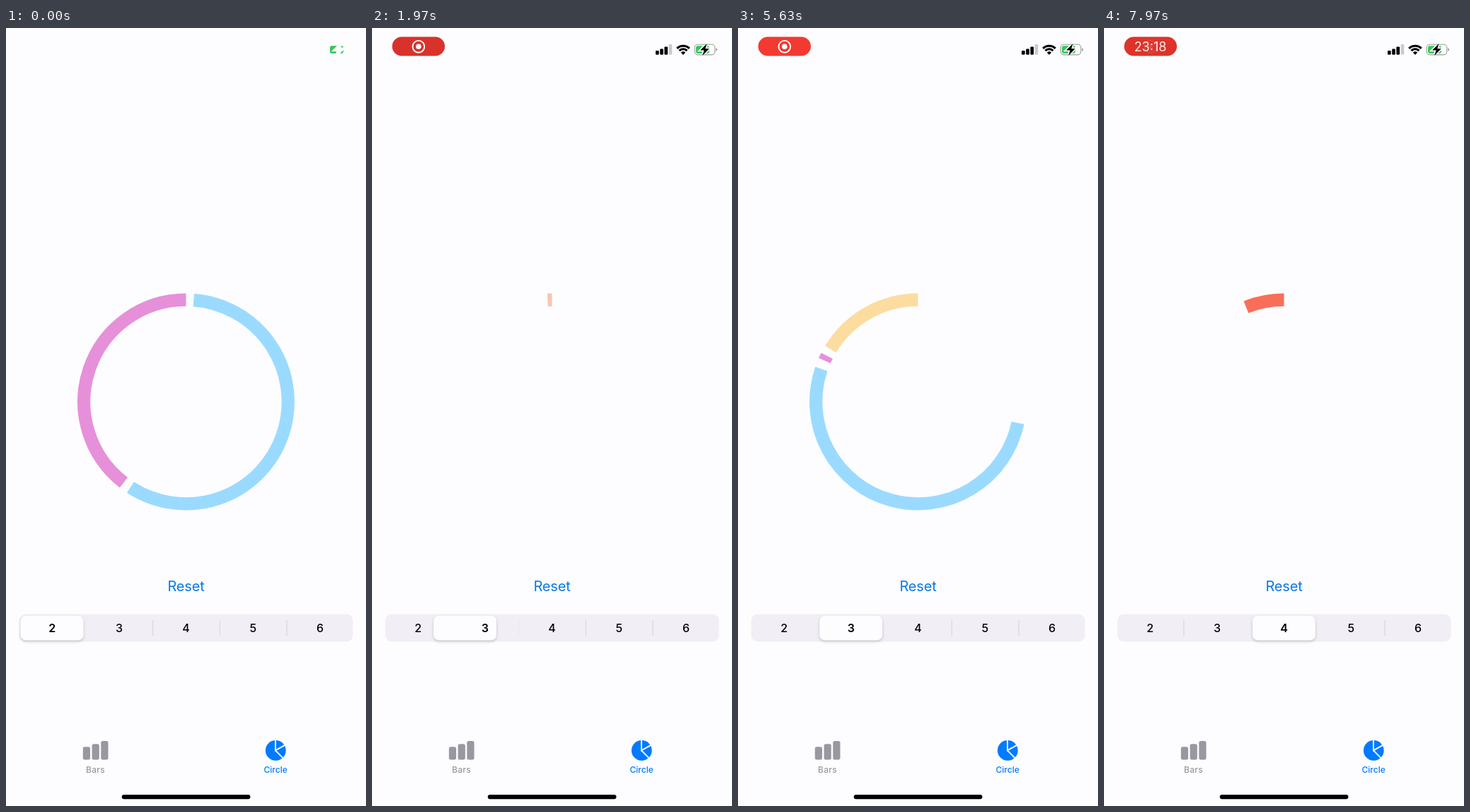
Animation of 509 by 1101 pixels, one loop 7990 ms. Source, as an HTML page:

```html
<!DOCTYPE html>
<html lang="en">
<head>
<meta charset="utf-8">
<title>Circle chart</title>
<style>
  html, body { margin: 0; width: 100%; height: 100%; overflow: hidden; background: #fdfdff; }
  svg { display: block; width: 100%; height: 100%; }
  text { font-family: Inter, "Liberation Sans", sans-serif; text-anchor: middle; }
</style>
</head>
<body>
<svg viewBox="0 0 509 1101">
  <defs>
    <filter id="shadow" x="-20%" y="-30%" width="140%" height="170%">
      <feDropShadow dx="0" dy="2" stdDeviation="2" flood-color="#000" flood-opacity=".2"/>
    </filter>
  </defs>
  <rect width="509" height="1101" fill="#fdfdff"/>

  <!-- recording pill -->
  <g id="pill">
    <rect id="pillBack" x="28.5" y="12.5" width="74.5" height="27" rx="13.5"/>
    <g id="record" fill="none" stroke="#fff" stroke-width="1.9">
      <circle cx="65.8" cy="26.3" r="8.4"/>
      <circle cx="65.8" cy="26.3" r="3.8" fill="#fff" stroke="none"/>
    </g>
    <text id="clock" x="65.5" y="32.7" font-size="18" fill="#fff">23:18</text>
  </g>

  <!-- status icons -->
  <rect x="458" y="25.3" width="19" height="10.6" rx="2.4" fill="#34c759"/>
  <path d="M473.5 22.3L464 31.6H469.6L467.2 38.9L476.8 29.3H471.3Z" fill="#fdfdff" stroke="#fdfdff" stroke-width="3.4"/>
  <g id="ink">
    <rect x="401" y="32" width="4.7" height="5.7" rx="1.2"/>
    <rect x="407.2" y="29.6" width="4.7" height="8.1" rx="1.2"/>
    <rect x="413.4" y="26.4" width="4.7" height="11.3" rx="1.2"/>
    <rect x="419.6" y="23" width="4.7" height="14.7" rx="1.2" fill="#cbcbcd"/>
    <g fill="none" stroke="#000" stroke-width="3">
      <path d="M431.2 28.8A12.8 12.8 0 0 1 448.8 28.8"/>
      <path d="M434.5 32.1A7.9 7.9 0 0 1 445.5 32.1"/>
    </g>
    <path d="M440 38L436.9 34.7A4.5 4.5 0 0 1 443.1 34.7Z"/>
    <rect x="456.2" y="23.3" width="28.6" height="14.6" rx="4.3" fill="none" stroke="#9b9b9d" stroke-width="1.1"/>
    <path d="M486.3 28.2Q488.2 29 488.2 30.6T486.3 33Z" fill="#9b9b9d"/>
    <path d="M473.5 22.3L464 31.6H469.6L467.2 38.9L476.8 29.3H471.3Z"/>
  </g>

  <g id="ring" fill="none" stroke-width="18.3"></g>

  <text x="254.5" y="797" font-size="20" letter-spacing="-.15" fill="#087ae4">Reset</text>

  <!-- segmented control -->
  <rect x="18.8" y="829.5" width="471.7" height="39" rx="9" fill="#f2eef5"/>
  <g id="dividers" fill="#d9d6dd"></g>
  <rect id="knob" x="20.7" y="831.8" width="88.6" height="34.4" rx="7.5" fill="#fdfdff" filter="url(#shadow)"/>
  <g id="digits" font-size="16"></g>

  <!-- tab bar -->
  <g fill="#9997a0">
    <rect x="108.8" y="1017.2" width="10.2" height="18.2" rx="2.6"/>
    <rect x="121.6" y="1013.2" width="10.2" height="22.2" rx="2.6"/>
    <rect x="134.3" y="1009" width="10.2" height="26.4" rx="2.6"/>
    <text x="126.5" y="1054" font-size="12" font-weight="500" letter-spacing=".25">Bars</text>
  </g>
  <g fill="#007aff">
    <circle cx="381.3" cy="1022.4" r="14.4"/>
    <path d="M381 1007V1022.4L395.5 1014.2M381 1022.4L392 1033.6" fill="none" stroke="#fdfdff" stroke-width="2"/>
    <text x="381.2" y="1054" font-size="12" font-weight="500" letter-spacing=".05">Circle</text>
  </g>
  <rect x="163.7" y="1085" width="181.8" height="6.2" rx="3.1"/>
</svg>
<script>
const LOOP = 7990;
const PINK = [230, 144, 218], BLUE = [155, 218, 255];
const YELLOW = [253, 220, 159], CORAL = [249, 110, 88];
// Chart states: start time and slices as [from, to, colour], degrees counterclockwise from the top
const charts = [
  { start: -1e4, slices: [[0, 142.4, PINK], [147, 355.7, BLUE]] },
  { start: 1908, slices: [[0, 58.9, YELLOW], [63.2, 66.2, PINK], [71.2, 355.7, BLUE]] },
  { start: 7415, slices: [[0, 140, CORAL]] }
];
// Drawn angle against time since the chart began
const sweepKeys = [[0, 0], [1362, 53.5], [1455, 63.2], [1502, 71], [2202, 122.5],
  [2762, 171.2], [3042, 198.8], [3882, 272], [4645, 356]];
const STEP = 94.7;

const $ = id => document.getElementById(id);
const clamp = x => Math.min(1, Math.max(0, x));
const ramp = (t, from, length) => clamp((t - from) / length);
const smooth = x => x * x * (3 - 2 * x);
const mix = (a, b, k) => a + (b - a) * k;
const rgb = c => `rgb(${c.map(Math.round)})`;
const blend = (a, b, k) => a.map((v, i) => mix(v, b[i], k));

function add(parent, tag, attrs) {
  const el = document.createElementNS('http://www.w3.org/2000/svg', tag);
  for (const name in attrs) el.setAttribute(name, attrs[name]);
  return parent.appendChild(el);
}

const arcs = [0, 1, 2].map(() => add($('ring'), 'path', {}));
const dividers = [0, 1, 2, 3].map(i =>
  add($('dividers'), 'rect', { x: 112.3 + i * STEP, y: 838, width: 1.2, height: 22 }));
const digits = [0, 1, 2, 3, 4].map(i => {
  const el = add($('digits'), 'text', { x: 65.2 + i * STEP, y: 855 });
  el.textContent = i + 2;
  return el;
});

function sweep(age) {
  for (let i = 1; i < sweepKeys.length; i++) {
    const [t0, a0] = sweepKeys[i - 1], [t1, a1] = sweepKeys[i];
    if (age < t1) return mix(a0, a1, (age - t0) / (t1 - t0));
  }
  return 360;
}

function arcPath(from, to) {
  const point = deg => {
    const a = deg * Math.PI / 180;
    return `${254.5 - 144.3 * Math.sin(a)} ${529 - 144.3 * Math.cos(a)}`;
  };
  return `M${point(from)}A144.3 144.3 0 ${+(to - from > 180)} 0 ${point(to)}`;
}

const slide = (t, chart) => smooth(ramp(t, chart.start - 120, 285));

function drawRing(t) {
  const now = charts.findLastIndex(c => t >= c.start);
  const { start, slices } = charts[now];
  const angle = sweep(t - start);
  arcs.forEach((arc, i) => {
    const slice = slices[i];
    if (!slice || angle <= slice[0]) return arc.setAttribute('d', '');
    let color = slice[2];
    if (now && i === 0) color = blend(charts[now - 1].slices[0][2], color, slide(t, charts[now]));
    arc.setAttribute('d', arcPath(slice[0], Math.min(angle, slice[1])));
    arc.setAttribute('stroke', rgb(color));
  });
}

function drawControl(t) {
  const pos = slide(t, charts[1]) + slide(t, charts[2]);
  $('knob').setAttribute('transform', `translate(${pos * STEP} 0)`);
  dividers.forEach((el, i) => el.setAttribute('opacity', clamp(Math.abs(pos - i - 0.5) - 0.5)));
  digits.forEach((el, i) => {
    el.setAttribute('font-weight', Math.round(pos) === i ? 600 : 500);
    let dim = 0;
    if (i === 1 || i === 2) {
      const s = charts[i].start;
      dim = ramp(t, s - 340, 100) * (1 - ramp(t, s - 130, 120));
    }
    el.setAttribute('opacity', 1 - 0.7 * dim);
  });
}

function drawStatus(t) {
  const shown = ramp(t, 430, 333);
  const scale = mix(0.48, 1, shown);
  const glow = 0.925 - 0.075 * Math.cos((t - 1980) / 5400 * 2 * Math.PI);
  const clock = smooth(ramp(t, 7600, 460));
  $('ink').setAttribute('opacity', ramp(t, 10, 250));
  $('pill').setAttribute('opacity', shown);
  $('pill').setAttribute('transform', `translate(65.8 26) scale(${scale}) translate(-65.8 -26)`);
  $('pillBack').setAttribute('fill', rgb([255, 59, 50].map(v => v * glow)));
  $('record').setAttribute('opacity', 1 - clock);
  $('clock').setAttribute('opacity', clock);
}

function draw(t) {
  drawRing(t);
  drawControl(t);
  drawStatus(t);
}

let origin;
function tick(now) {
  origin ??= now;
  draw((now - origin) % LOOP);
  requestAnimationFrame(tick);
}
draw(0);
requestAnimationFrame(tick);
</script>
</body>
</html>
```
